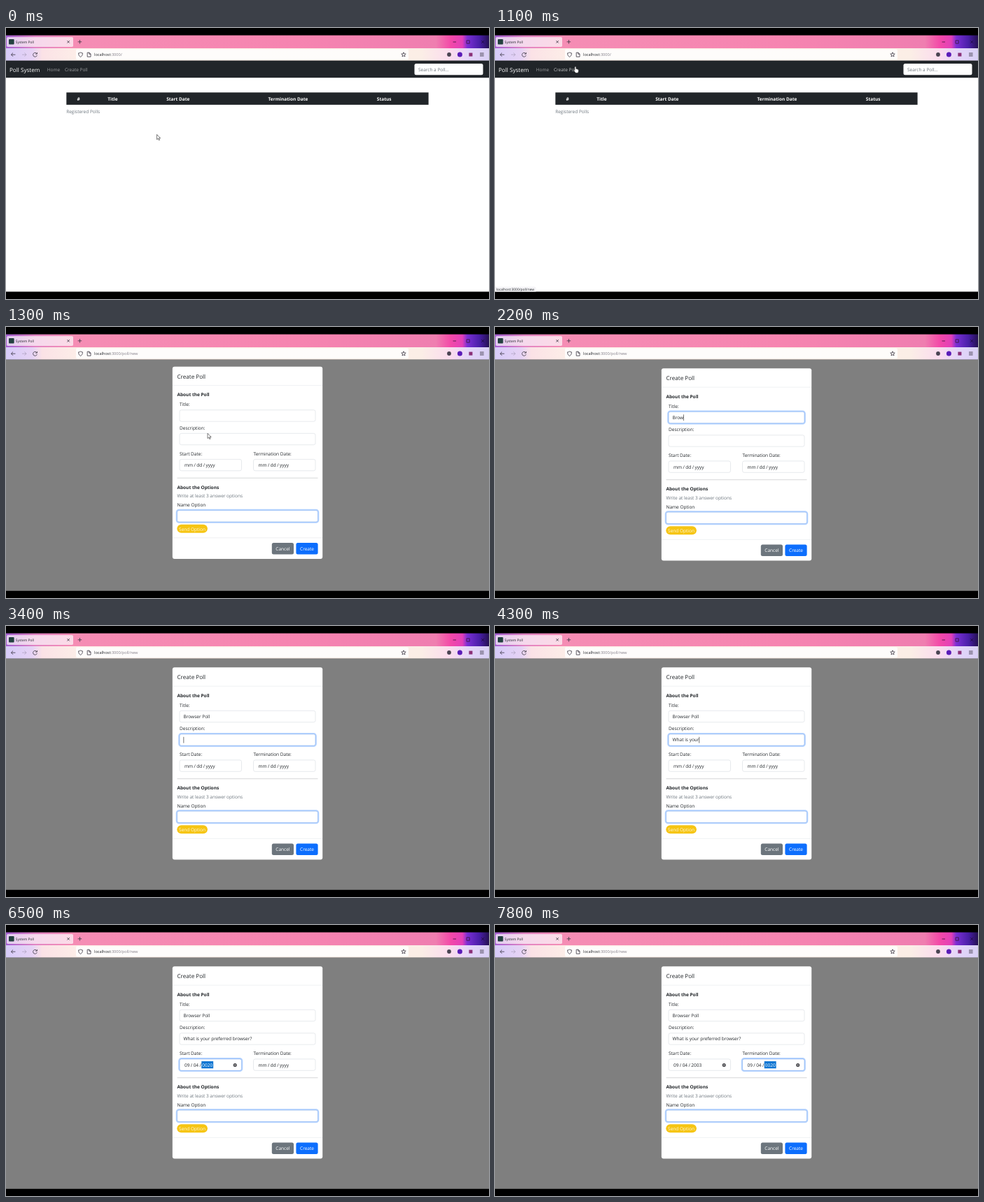
An HTML page that plays this animation: 690 px wide and 388 px high, repeating every 8000 ms.

```html
<!DOCTYPE html>
<html lang="en">
<head>
<meta charset="utf-8">
<title>System Poll</title>
<style>
  html, body { margin: 0; width: 100%; height: 100%; overflow: hidden; background: #000; }
  svg { display: block; width: 100%; height: 100%; }
  text {
    font: 6.5px "Open Sans", "Noto Sans", sans-serif;
    fill: #212529; white-space: pre; text-rendering: geometricPrecision;
  }
  .big { font-size: 8.1px; }
  .url { font-size: 5.6px; }
  .small { font-size: 4.88px; }
  .bold { font-weight: 700; }
  .muted { fill: #6c757d; }
  .link { fill: #9b9d9f; }
  .white { fill: #fff; }
  .mid { text-anchor: middle; }
  .icon { fill: none; stroke: #38333f; stroke-width: .8; }
  .field { fill: #fff; stroke: #ced4da; stroke-width: .5; }
  .ring { fill: none; stroke: #0d6efd; stroke-opacity: .3; stroke-width: 1.8; }
  .edge { fill: none; stroke: #86b7fe; stroke-width: .5; }
  .caret { stroke: #111; stroke-width: .6; }
</style>
</head>
<body>
<svg viewBox="0 0 690 388">
  <defs>
    <linearGradient id="strip" gradientUnits="userSpaceOnUse" x1="0" y1="0" x2="690" y2="0">
      <stop offset="0" stop-color="#a45fd2"/>
      <stop offset=".06" stop-color="#e286c4"/>
      <stop offset=".14" stop-color="#f58db4"/>
      <stop offset=".6" stop-color="#f684b0"/>
      <stop offset=".89" stop-color="#ef7eb0"/>
      <stop offset=".92" stop-color="#f34aa8"/>
      <stop offset=".945" stop-color="#e23fb8"/>
      <stop offset=".955" stop-color="#7a2fd4"/>
      <stop offset=".98" stop-color="#4a1fa8"/>
      <stop offset="1" stop-color="#241052"/>
    </linearGradient>
    <linearGradient id="bar" gradientUnits="userSpaceOnUse" x1="0" y1="0" x2="690" y2="0">
      <stop offset="0" stop-color="#d6cbf8"/>
      <stop offset=".055" stop-color="#e6d3f5"/>
      <stop offset=".075" stop-color="#fbe2e6"/>
      <stop offset=".15" stop-color="#fdeee8"/>
      <stop offset=".86" stop-color="#fbeee6"/>
      <stop offset=".92" stop-color="#fbdcee"/>
      <stop offset=".96" stop-color="#e2d5fa"/>
      <stop offset="1" stop-color="#d9d0f4"/>
    </linearGradient>
  </defs>

  <rect width="690" height="388"/>
  <rect y="46.5" width="690" height="331" fill="#fff"/>

  <g id="home">
    <rect y="46.5" width="690" height="24.7" fill="#212529"/>
    <text x="5" y="62.8" class="big white">Poll System</text>
    <text x="58.7" y="62.2" class="link">Home</text>
    <text x="84" y="62.2" class="link" id="createLink">Create Poll</text>
    <rect x="583.5" y="51" width="98" height="16.3" rx="2.5" fill="#fff"/>
    <text x="589" y="62" class="muted">Search a Poll...</text>
    <rect x="86.3" y="92.3" width="517.3" height="17.6" fill="#212529"/>
    <g id="heads"></g>
    <text x="86.2" y="121.8" class="muted">Registered Polls</text>
    <g id="status">
      <path d="M0 370.5H56.5a2 2 0 0 1 2 2V377.5H0Z" fill="#f4f3f6"/>
      <text x="1.8" y="375.8" class="small">localhost:3000/poll/new</text>
    </g>
  </g>

  <rect id="shade" y="46.5" width="690" height="331"/>

  <g id="modal">
    <rect x="237.8" y="59.3" width="214.4" height="275.2" rx="3" fill="#fff"/>
    <path d="M238 86.2H452M238 304.3H452" stroke="#dee2e6" stroke-width=".5"/>
    <path d="M244.5 218.7H445.5" stroke="#bcbec0" stroke-width=".6"/>
    <text x="244.5" y="76.4" class="big">Create Poll</text>
    <g id="labels"></g>
    <g id="fields"></g>
    <rect x="244.3" y="285.3" width="43.6" height="12" rx="6" fill="#f6c514"/>
    <text x="266" y="294" class="mid" style="fill:#fff8dc">Send Option</text>
    <rect x="379.8" y="311.4" width="31.2" height="16.5" rx="2.5" fill="#6c757d"/>
    <text x="395.4" y="322.4" class="mid white">Cancel</text>
    <rect x="414.4" y="311.4" width="31.2" height="16.5" rx="2.5" fill="#0d6efd"/>
    <text x="430" y="322.4" class="mid white">Create</text>
  </g>

  <!-- browser frame -->
  <rect y="10.5" width="690" height="18.5" fill="url(#strip)"/>
  <rect y="29" width="690" height="17.5" fill="url(#bar)"/>
  <rect x="1" y="13" width="95" height="14" rx="1.8" fill="#fff" fill-opacity=".68"/>
  <rect x="4" y="16" width="7.6" height="7.6" rx="1" fill="#23413f"/>
  <text x="13.8" y="21.8" class="small">System Poll</text>
  <path class="icon" d="M87.4 18.1l3.4 3.4m0-3.4l-3.4 3.4M102.6 19.8h5.6M105.4 17v5.6"/>
  <path class="icon" d="M638.6 20h4.4M658 17.9h4.2v4.2H658Z" style="stroke:#3b1235"/>
  <path class="icon" d="M679.2 17.9l4 4m0-4l-4 4" style="stroke:#1b0b3a"/>
  <rect x="100" y="30.6" width="475" height="14.6" rx="1.8" fill="#fff" fill-opacity=".82"/>
  <path class="icon" d="M13.4 38.2H7.4M10 35.6L7.4 38.2L10 40.8"/>
  <path class="icon" d="M23 38.2h6M26.4 35.6L29 38.2L26.4 40.8" opacity=".28"/>
  <path class="icon" d="M44 36.8a2.9 2.9 0 1 0 .3 2.4M44.4 35v2.2h-2.2"/>
  <path class="icon" d="M106.5 35c1 .8 1.900 .9 2.900 .9c0 2.800-.8 4.400-2.900 5.600c-2.100-1.200-2.900-2.800-2.900-5.600c1 0 1.900-.1 2.900-.9Z"/>
  <path class="icon" d="M116.2 35.2h2.800l2 2v4h-4.800ZM118.800 35.300v2.100h2.100"/>
  <text x="126" y="40.3" class="url">localhost<tspan id="path" fill="#85808a"></tspan></text>
  <path id="star" class="icon"/>
  <circle cx="633" cy="38" r="2.900" fill="#4a4452"/>
  <circle cx="648.4" cy="38" r="3.500" fill="#5a1cb8"/>
  <rect x="661.4" y="35.6" width="5" height="5" fill="#8a3078"/>
  <path class="icon" d="M677 36h5.600M677 38h5.600M677 40h5.600"/>

  <g id="arrow">
    <path d="M0 0V7.200L1.700 5.700L2.900 8.200L4.100 7.700L2.900 5.200H5.100Z" fill="#fff" stroke="#222" stroke-width=".6"/>
  </g>
  <g id="hand">
    <path d="M1 0c.8 0 1 .5 1 1V3.300c.4-.4 1.200-.2 1.300 .3c.5-.3 1.100 0 1.200 .5c.5-.2 1 .1 1 .7V7L4.700 9H1.300L-1.100 5.700c-.4-.7 .4-1.200 .9-.7L.1 5.400V1c0-.5 .2-1 .9-1Z" fill="#fff" stroke="#222" stroke-width=".5"/>
  </g>
  <path id="beam" class="icon" d="M-1.300-4.500q1.300 0 1.300 1v7q0 1-1.300 1M1.300-4.500q-1.300 0-1.300 1M0 3.500q0 1 1.300 1" style="stroke-width:.6"/>
</svg>

<script>
const LOOP = 8000, STEP = 100;
const $ = id => document.getElementById(id);
const clamp = v => Math.max(0, Math.min(1, v));

function add(parent, tag, attrs = {}, content = '') {
  const node = document.createElementNS('http://www.w3.org/2000/svg', tag);
  for (const k in attrs) node.setAttribute(k, attrs[k]);
  node.textContent = content;
  parent.appendChild(node);
  return node;
}
const set = (node, attrs) => { for (const k in attrs) node.setAttribute(k, attrs[k]); };
const show = (node, on) => { node.style.display = on ? '' : 'none'; };

// Linear interpolation through [time, value, ...] keys
function along(keys, t) {
  let i = 0;
  while (i < keys.length - 1 && keys[i + 1][0] <= t) i++;
  const a = keys[i], b = keys[i + 1];
  if (!b || t <= a[0]) return a.slice(1);
  const p = (t - a[0]) / (b[0] - a[0]);
  return a.slice(1).map((v, n) => v + (b[n + 1] - v) * p);
}
const latest = (keys, t) => keys.filter(k => k[0] <= t).pop();

// Static text
[['#', 103.5], ['Title', 152.5], ['Start Date', 245.8], ['Termination Date', 403], ['Status', 540.2]]
  .forEach(([s, x]) => add($('heads'), 'text', { x, y: 103.8, class: 'bold white mid' }, s));

[['About the Poll', 244.5, 101.9, 'bold'], ['Title:', 248, 115.5], ['Description:', 248, 149.2],
 ['Start Date:', 248, 186.2], ['Termination Date:', 353.5, 186.2],
 ['About the Options', 244.5, 234, 'bold'], ['Write at least 3 answer options', 244.5, 246.6, 'muted'],
 ['Name Option', 244.5, 259.6]]
  .forEach(([s, x, y, c = '']) => add($('labels'), 'text', { x, y, class: c }, s));

const starPoints = [...Array(10)].map((_, i) => {
  const r = i % 2 ? 1.5 : 3.4, a = i * Math.PI / 5;
  return `${(568 + r * Math.sin(a)).toFixed(2)} ${(38.2 - r * Math.cos(a)).toFixed(2)}`;
});
$('star').setAttribute('d', `M${starPoints.join('L')}Z`);

// Form fields
function box(x, y, w, on = Infinity, off = Infinity) {
  const g = add($('fields'), 'g');
  const size = { x, y, width: w, height: 16.4, rx: 2.5 };
  add(g, 'rect', { ...size, class: 'field' });
  const glow = add(g, 'g');
  add(glow, 'rect', { x: x - .9, y: y - .9, width: w + 1.8, height: 18.2, rx: 3.4, class: 'ring' });
  add(glow, 'rect', { ...size, class: 'edge' });
  const draw = t => set(glow, {
    opacity: Math.min(clamp((t - on) / 200 + .5), clamp(.5 - (t - off) / 200))
  });
  return { g, draw };
}

function textField(y, on, off, value, keys, blink) {
  const { g, draw } = box(248, y, 194, on, off);
  const text = add(g, 'text', { x: 253.6, y: y + 10.6 });
  const caret = add(g, 'path', { class: 'caret' });
  return t => {
    draw(t);
    text.textContent = value.slice(0, Math.round(along(keys, t)[0]));
    const x = 253.8 + (text.textContent ? text.getComputedTextLength() : 0);
    set(caret, { d: `M${x} ${y + 4}v8.800` });
    show(caret, t >= on && t < off && !blink(t));
  };
}

function dateField(x, on, off, keys) {
  const y = 191.9, gap = 1.4;
  const { g, draw } = box(x, y, 88.5, on, off);
  const mark = add(g, 'rect', { y: y + 3.2, height: 10.2, fill: '#0a74d2' });
  const parts = [...Array(5)].map((_, i) => add(g, 'text', { y: y + 10.9 }, i % 2 ? '/' : ''));
  const clear = add(g, 'g');
  add(clear, 'circle', { cx: x + 79.2, cy: y + 8.6, r: 2.6, fill: '#4c4c50' });
  add(clear, 'path', {
    d: `M${x + 78.2} ${y + 7.6}l2 2m0-2l-2 2`, stroke: '#fff', 'stroke-width': .6
  });
  return t => {
    draw(t);
    const [, value, selected] = latest(keys, t);
    const words = value.split('/');
    let left = x + 7;
    show(mark, selected >= 0);
    parts.forEach((part, i) => {
      if (i % 2 === 0) part.textContent = words[i / 2];
      const w = part.getComputedTextLength(), lit = i === selected * 2;
      set(part, { x: left });
      part.style.fill = lit ? '#fff' : '';
      if (lit) set(mark, { x: left - 1, width: w + 2 });
      left += w + gap;
    });
    show(clear, /\d/.test(value));
  };
}

const never = () => false;
const fields = [
  textField(121.3, 1700, 2900, 'Browser Poll', [[1900, 0], [2800, 12]], never),
  textField(154.8, 2900, 5900, 'What is your preferred browser?',
    [[3400, 0], [3900, 7], [4000, 7], [4900, 22], [5000, 24], [5300, 27], [5500, 30], [5600, 30], [5700, 31]],
    t => t >= 3200 && t < 3400),
  dateField(248, 5900, 7000, [
    [0, 'mm/dd/yyyy', -1], [5900, 'mm/dd/yyyy', 0], [6200, '09/dd/yyyy', 1], [6300, '09/00/yyyy', 1],
    [6400, '09/04/yyyy', 2], [6500, '09/04/0020', 2], [6600, '09/04/0200', 2], [6700, '09/04/2003', 2],
    [7000, '09/04/2003', -1]]),
  dateField(353.5, 7000, Infinity, [
    [0, 'mm/dd/yyyy', -1], [7000, 'mm/dd/yyyy', 0], [7300, '09/dd/yyyy', 1],
    [7600, '09/04/yyyy', 2], [7800, '09/04/0020', 2]])
];
box(244.5, 265.1, 201);

const pointer = [[0, 215.5, 152.5], [300, 216, 162], [600, 216, 162], [1100, 113.8, 55.3],
  [1200, 184, 100.5], [1300, 288, 152.3], [1400, 310, 134], [1500, 313, 131.3]];
const slide = [[1300, -2.5], [1400, -.4], [1500, 0]];

function render(t) {
  const opened = t >= 1200, hover = t >= 1100 && !opened;
  show($('home'), !opened);
  show($('status'), hover);
  $('createLink').style.fill = hover ? '#c4c5c6' : '';
  $('path').textContent = opened ? ':3000/poll/new' : ':3000/';
  set($('shade'), { opacity: !opened ? 0 : t < 1300 ? .165 : .5 });

  show($('modal'), t >= 1300);
  set($('modal'), { transform: `translate(0 ${along(slide, t)[0]})` });
  if (t >= 1300) fields.forEach(draw => draw(t));

  const place = { transform: `translate(${along(pointer, t).join(' ')})` };
  ['arrow', 'hand', 'beam'].forEach(id => set($(id), place));
  show($('arrow'), t < 1400 && !hover);
  show($('hand'), hover);
  show($('beam'), t >= 1400 && t < 2000);
}

const begin = performance.now();
function frame() {
  const t = (performance.now() - begin) % LOOP;
  render(Math.floor(t / STEP) * STEP);
  requestAnimationFrame(frame);
}
frame();
</script>
</body>
</html>
```
